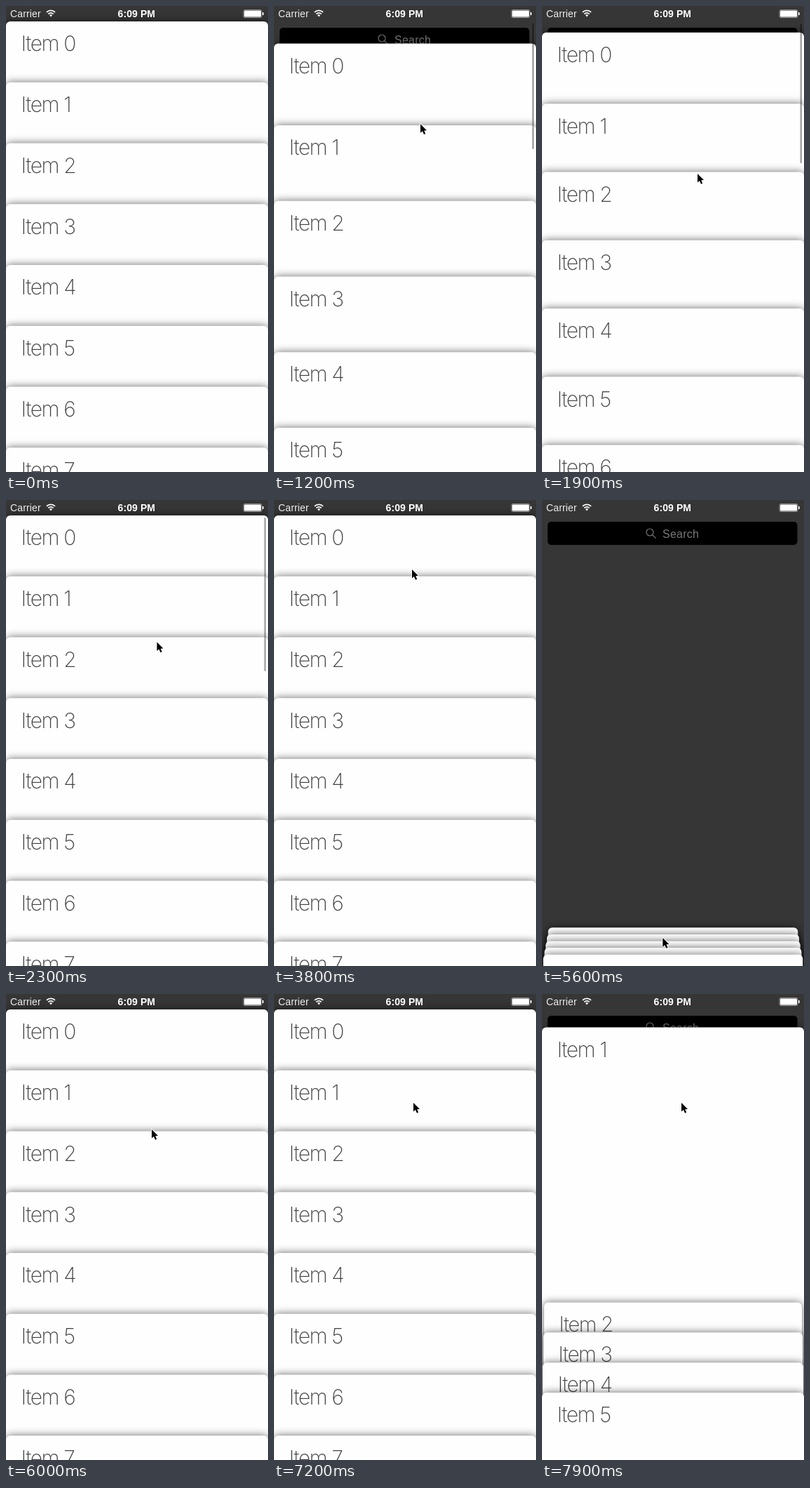
Write an HTML page with a canvas that moves like this. It is 374x664 px and loops after 8000 ms.

```html
<!DOCTYPE html>
<html lang="en">
<head>
<meta charset="utf-8">
<title>Card stack</title>
<style>
  html, body { margin: 0; width: 100%; height: 100%; overflow: hidden; background: #363636; }
  canvas { display: block; width: 374px; height: 664px; }
</style>
</head>
<body>
<canvas id="stage" width="374" height="664"></canvas>
<script>
const W = 374, H = 664, LOOP = 8000;
const TOP = 22, GAP = 86.75, CARDS = 9;
const PICKED = 1;
const ctx = document.getElementById('stage').getContext('2d');

const clamp = v => Math.max(0, Math.min(1, v));
const smooth = v => v * v * (3 - 2 * v);
const mix = (a, b, p) => a + (b - a) * p;
const ramp = (t, from, to) => smooth(clamp((t - from) / (to - from)));

// Pointer path: time, x, y, linear?
const path = [
  [100, 380, 300], [250, 200, 108], [400, 200, 108],
  [1200, 209, 168, true], [1650, 222, 239, true], [2100, 222, 239],
  [2700, 197, 99], [3800, 197, 99], [4290, 219, 519], [4600, 219, 519],
  [5200, 171, 640], [5550, 171, 640], [6000, 208, 193], [6200, 205, 160],
  [6400, 205, 160], [6500, 199, 155], [LOOP, 199, 155]
];

function pointer(t) {
  if (t < path[0][0]) return null;
  const n = path.findIndex(k => k[0] > t);
  const a = path[n - 1], b = path[n];
  const u = (t - a[0]) / (b[0] - a[0]);
  const p = b[3] ? u : smooth(u);
  return { x: mix(a[1], b[1], p), y: mix(a[2], b[2], p) };
}

// Resistance of an overscrolled list
const rubber = x => H * (1 - 1 / (Math.max(0, x) * 0.55 / H + 1));

function pull(t) {
  if (t > 400 && t <= 1650) return rubber(pointer(t).y - 108);
  if (t > 1650 && t < 2300) {
    const s = (t - 1650) * 0.0109;
    return rubber(131) * (1 + s) * Math.exp(-s);
  }
  if (t > 3850 && t < 4400) return rubber(pointer(t).y - pointer(3850).y);
  return 0;
}

function listTop(i, d) {
  return TOP + i * GAP + d * (i ? 1.28 + 0.665 * i : 1);
}

function cardPose(i, t, d) {
  const fold = ramp(t, 4010, 4270) - ramp(t, 5560, 5940);
  const pick = ramp(t, 7740, 8037);
  const inset = Math.max(0, 5 - i) * 1.8;
  let top = listTop(i, d), side = 0;
  if (fold > 0) {
    top = mix(top, i < 5 ? 629 + 7 * i : 680 + 30 * i, fold);
    side = inset * fold;
  }
  if (pick > 0) {
    const end = i === PICKED ? 0 : i < PICKED ? 622 : i < 6 ? 629 + (i - 2) * 8.7 : 790;
    top = mix(top, end, pick);
    if (i !== PICKED) side = inset * pick;
  }
  return { top, side };
}

function roundBox(x, y, w, h, r) {
  ctx.beginPath();
  ctx.roundRect(x, y, w, h, r);
}

function label(str, x, y, font, color, spacing = 0) {
  ctx.font = font;
  ctx.fillStyle = color;
  ctx.letterSpacing = spacing + 'px';
  ctx.fillText(str, x, y);
}

function drawSearch() {
  ctx.fillStyle = '#000';
  roundBox(8, 31, 356.5, 33, 5);
  ctx.fill();
  ctx.strokeStyle = '#777';
  ctx.lineWidth = 1.2;
  ctx.beginPath();
  ctx.arc(154, 46, 5, 0, 7);
  ctx.moveTo(157.7, 49.7);
  ctx.lineTo(162.5, 54.5);
  ctx.stroke();
  label('Search', 172, 53.5, '16px "Liberation Sans", sans-serif', '#777', 0.25);
}

function drawCard(i, pose) {
  if (pose.top > H + 12) return;
  const scale = (W - 2 * pose.side) / W;
  ctx.save();
  ctx.translate(pose.side, pose.top);
  ctx.scale(scale, scale);
  ctx.save();
  ctx.shadowColor = 'rgba(0,0,0,0.6)';
  ctx.shadowBlur = 12;
  ctx.fillStyle = '#fefefe';
  roundBox(0, 0, W, 720, 6);
  ctx.fill();
  ctx.restore();
  label('Item ' + i, 21.5, 42.3, '200 30px Inter, Roboto, sans-serif', '#444', -1.45);
  ctx.restore();
}

function drawIndicator(t, d) {
  const alpha = ramp(t, 400, 550) - ramp(t, 2250, 2600)
    + ramp(t, 3850, 3950) - ramp(t, 4150, 4300);
  if (alpha <= 0) return;
  ctx.fillStyle = `rgba(0,0,0,${0.36 * alpha})`;
  roundBox(368.5, 25, 2.5, Math.max(8, 219 - 1.27 * d), 1.2);
  ctx.fill();
}

function drawWifi() {
  ctx.strokeStyle = ctx.fillStyle = '#fff';
  ctx.lineWidth = 1.8;
  for (const r of [5.2, 8.6]) {
    ctx.beginPath();
    ctx.arc(64, 15, r, -Math.PI * 0.75, -Math.PI * 0.25);
    ctx.stroke();
  }
  ctx.beginPath();
  ctx.moveTo(64, 15.5);
  ctx.arc(64, 15, 2.8, -Math.PI * 0.75, -Math.PI * 0.25);
  ctx.fill();
}

function drawStatus() {
  label('Carrier', 6, 15.8, '14px "Liberation Sans", sans-serif', '#eee', 0.15);
  drawWifi();
  label('6:09 PM', 159.5, 15.8, 'bold 14px "Liberation Sans", sans-serif', '#fff', 0.1);
  ctx.strokeStyle = '#aaa';
  ctx.lineWidth = 0.8;
  roundBox(339, 5.5, 26, 11, 2);
  ctx.stroke();
  ctx.fillStyle = '#fff';
  roundBox(340, 6.5, 24, 9, 1);
  ctx.fill();
  ctx.fillRect(366, 9, 1.6, 4);
}

function drawPointer(p) {
  if (!p) return;
  ctx.save();
  ctx.translate(p.x, p.y);
  ctx.scale(0.9, 0.9);
  ctx.beginPath();
  const pts = [[0, 0], [0, 14], [3.2, 11.2], [5.6, 16.4], [8, 15.3], [5.8, 10.3], [10, 10]];
  for (const [x, y] of pts) ctx.lineTo(x, y);
  ctx.closePath();
  ctx.lineJoin = 'round';
  ctx.lineWidth = 2;
  ctx.strokeStyle = '#fff';
  ctx.stroke();
  ctx.fillStyle = '#000';
  ctx.fill();
  ctx.restore();
}

function draw(t) {
  const d = pull(t);
  ctx.fillStyle = '#363636';
  ctx.fillRect(0, 0, W, H);
  drawSearch();
  for (let i = 0; i < CARDS; i++) drawCard(i, cardPose(i, t, d));
  drawIndicator(t, d);
  drawStatus();
  drawPointer(pointer(t));
}

const start = performance.now();
function tick() {
  draw((performance.now() - start) % LOOP);
  requestAnimationFrame(tick);
}
tick();
</script>
</body>
</html>
```
